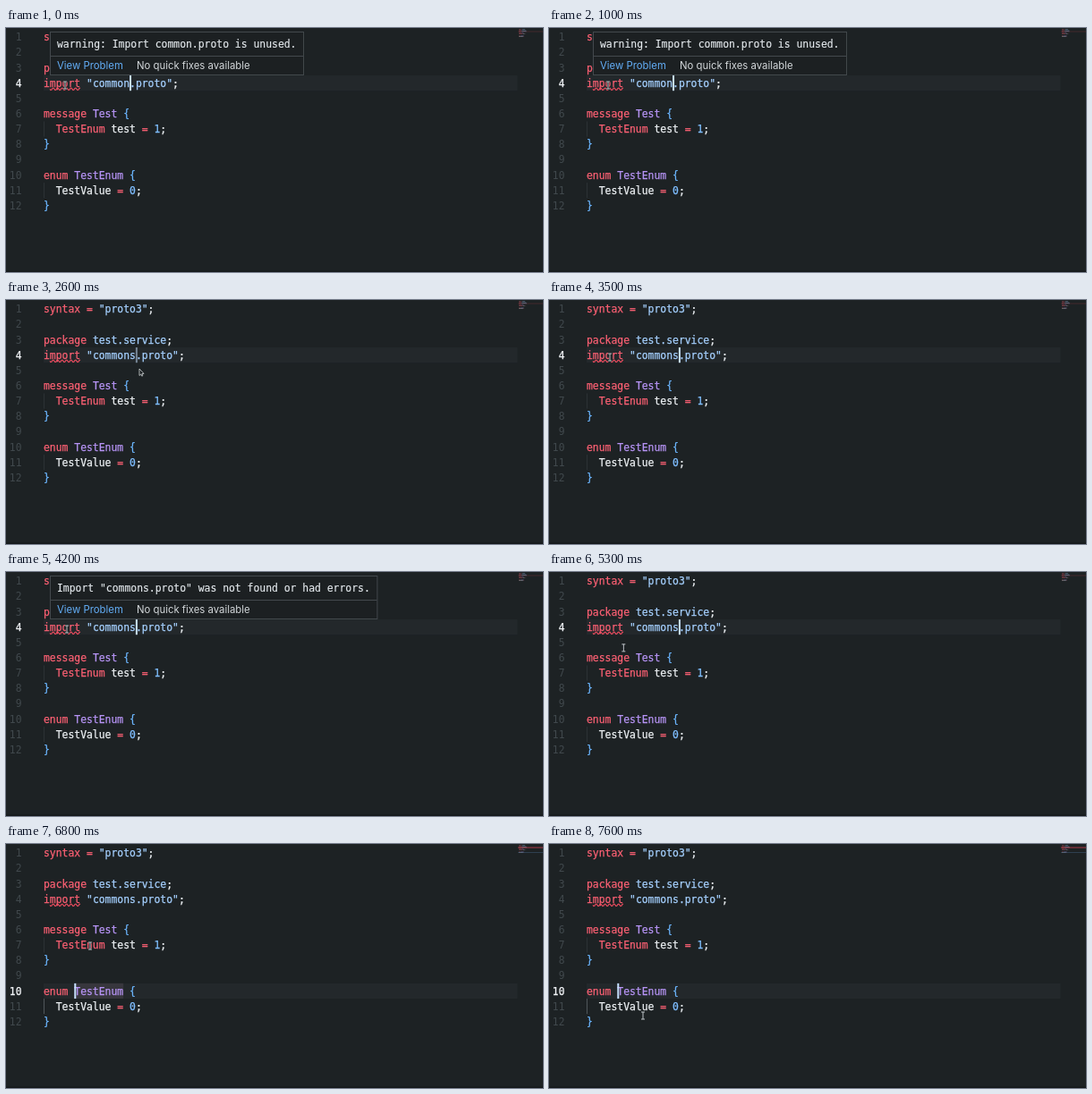
Write an HTML page with a canvas that moves like this. It is 600 px wide and 273 px high and loops after 7.7 s.

```html
<!DOCTYPE html>
<html lang="en">
<head>
<meta charset="utf-8">
<title>Editor diagnostics</title>
<style>
  html, body { margin: 0; width: 100%; height: 100%; overflow: hidden; background: #1d2224; }
  canvas { display: block; width: 600px; height: 273px; }
</style>
</head>
<body>
<canvas id="stage"></canvas>
<script>
const canvas = document.getElementById('stage');
const ctx = canvas.getContext('2d');
const ratio = window.devicePixelRatio || 1;
canvas.width = 600 * ratio;
canvas.height = 273 * ratio;
ctx.scale(ratio, ratio);

const LOOP = 7700, STEP = 100;
const TYPED = 2200, JUMPED = 6500, HIGHLIGHT_END = 7300;
const LEFT = 42, CHAR = 6.86, LINE = 17.14;
const MONO = '11.4px "DejaVu Sans Mono", monospace';
const SANS = '11.35px Inter, sans-serif';
const COLORS = {
  k: '#fb6073', s: '#a5d0ff', t: '#b794f6', n: '#7fbeff', b: '#6cb6ff', w: '#eef2f5'
};

// Each token is a colour key, a colon and its text.
const codeLines = file => [
  ['k:syntax ', 'k:= ', 's:"proto3"', 'w:;'],
  [],
  ['k:package ', 's:test.service', 'w:;'],
  ['k:import ', `s:"${file}.proto"`, 'w:;'],
  [],
  ['k:message ', 't:Test ', 'b:{'],
  ['k:  TestEnum ', 'w:test ', 'k:= ', 'n:1', 'w:;'],
  ['b:}'],
  [],
  ['k:enum ', 't:TestEnum ', 'b:{'],
  ['w:  TestValue ', 'k:= ', 'n:0', 'w:;'],
  ['b:}']
];

// Pointer stops: time, x, y.
const pointerPath = [
  [0, 66, 64], [1000, 66, 64], [1600, 150, 81], [2600, 150, 81], [3200, 68, 64],
  [5000, 68, 64], [5700, 107, 117], [6200, 107, 117], [6600, 94, 114],
  [6900, 94, 114], [7500, 105, 192], [LOOP, 105, 192]
];

const clamp = v => Math.min(1, Math.max(0, v));
const ease = v => v * v * (3 - 2 * v);
const lineCenter = n => 10.2 + LINE * (n - 1);
const columnX = c => LEFT + CHAR * c;

function rect(x, y, w, h, color) {
  ctx.fillStyle = color;
  ctx.fillRect(x, y, w, h);
}

// A hairline outline gives the code a medium weight.
function text(str, x, y, color, { font = MONO, align = 'left', weight = 0.25 } = {}) {
  ctx.font = font;
  ctx.textAlign = align;
  ctx.fillStyle = ctx.strokeStyle = color;
  ctx.fillText(str, x, y);
  if (weight) {
    ctx.lineWidth = weight;
    ctx.strokeText(str, x, y);
  }
}

function stroke(points, color, width) {
  ctx.beginPath();
  points.forEach(([x, y]) => ctx.lineTo(x, y));
  ctx.strokeStyle = color;
  ctx.lineWidth = width;
  ctx.stroke();
}

function pointerAt(t) {
  const i = pointerPath.findIndex(p => p[0] > t);
  const [t0, x0, y0] = pointerPath[i - 1], [t1, x1, y1] = pointerPath[i];
  const k = ease((t - t0) / (t1 - t0));
  return [x0 + (x1 - x0) * k, y0 + (y1 - y0) * k];
}

function caretAlpha(t) {
  const start = t >= JUMPED ? JUMPED : t >= TYPED ? TYPED : -300;
  const phase = (t - start) % 1000;
  return clamp((Math.abs(phase - 650) - 150) / 200);
}

function drawCode(lines, current) {
  lines.forEach((tokens, i) => {
    const n = i + 1, y = lineCenter(n) + 4.1;
    text(n, 17.5, y, n === current ? '#f0f3f6' : '#40484c',
      { align: 'right', weight: n === current ? 0.25 : 0 });
    let column = 0;
    for (const token of tokens) {
      const str = token.slice(2);
      text(str, columnX(column), y, COLORS[token[0]]);
      column += str.length;
    }
  });
}

function drawSquiggle() {
  const points = Array.from({ length: 35 }, (_, i) =>
    [49 + i, 68.3 + 1.3 * Math.sin(i * Math.PI / 2.5)]);
  stroke(points, '#ee4c5f', 1.1);
}

function drawMinimap(lines, jumped) {
  ctx.globalAlpha = 0.5;
  lines.forEach((tokens, i) => {
    let x = 573;
    for (const token of tokens) {
      const width = (token.length - 2) * 0.43;
      rect(x, 1 + i * 0.84, width - 0.4, 0.6, COLORS[token[0]]);
      x += width;
    }
  });
  ctx.globalAlpha = jumped ? 0.75 : 0.2;
  rect(572, 3.5, 28, 1, '#d94355');
  if (jumped) {
    ctx.globalAlpha = 0.45;
    rect(572, 9, 28, 1, '#466587');
  }
  ctx.globalAlpha = 1;
}

function drawTooltip(message, alpha) {
  const width = message.length * CHAR + 16.5;
  ctx.globalAlpha = alpha;
  rect(49, 4, width, 49, '#1c2022');
  ctx.strokeStyle = '#43494d';
  ctx.lineWidth = 1;
  ctx.strokeRect(49.5, 4.5, width - 1, 48);
  rect(50, 31, width - 2, 1, '#43494d');
  text(message, 57, 22, '#e4e9ed', { weight: 0.15 });
  text('View Problem', 57, 46, '#63aef7', { font: SANS, weight: 0 });
  text('No quick fixes available', 146, 46, '#d3d7da', { font: SANS, weight: 0 });
  ctx.globalAlpha = 1;
}

function drawPointer(x, y, arrow) {
  if (arrow) {
    ctx.beginPath();
    [[-1, -4], [-1, 3.5], [0.7, 2], [1.8, 4.2], [2.8, 3.7], [1.8, 1.6], [4, 1.4]]
      .forEach(([dx, dy]) => ctx.lineTo(x + dx, y + dy));
    ctx.closePath();
    ctx.fillStyle = '#15191b';
    ctx.fill();
    ctx.strokeStyle = '#d4d8da';
    ctx.lineWidth = 0.8;
    ctx.stroke();
    return;
  }
  for (const [color, width] of [['#1a1e20', 2.2], ['#bfc5c9', 1]]) {
    stroke([[x - 2, y - 4], [x + 2, y - 4]], color, width);
    stroke([[x, y - 4], [x, y + 4]], color, width);
    stroke([[x - 2, y + 4], [x + 2, y + 4]], color, width);
  }
}

function draw(t) {
  const typed = t >= TYPED, jumped = t >= JUMPED;
  const current = jumped ? 10 : 4;
  const lines = codeLines(typed ? 'commons' : 'common');
  const top = lineCenter(current) - LINE / 2;

  rect(0, 0, 600, 273, '#1d2224');
  rect(LEFT, top, 529.5, LINE, '#23282b');
  if (jumped && t < HIGHLIGHT_END) rect(columnX(5), top, CHAR * 8, LINE, '#37363d');
  for (const n of [7, 11]) {
    rect(LEFT, lineCenter(n) - LINE / 2, 1, LINE, jumped && n === 11 ? '#50575b' : '#2c3235');
  }

  drawCode(lines, current);
  drawSquiggle();
  drawMinimap(lines, jumped);

  ctx.globalAlpha = caretAlpha(t);
  rect(columnX(jumped ? 5 : typed ? 15 : 14), top, 2, LINE, '#c8e1ff');
  ctx.globalAlpha = 1;

  if (t < 1200) drawTooltip('warning: Import common.proto is unused.', 1);
  if (t >= 3800 && t < 5200) {
    drawTooltip('Import "commons.proto" was not found or had errors.', clamp((t - 3700) / 200));
  }

  rect(0, 271.5, 600, 1.5, '#14181a');
  const [x, y] = pointerAt(t);
  drawPointer(x, y, t >= 1500 && t < 2800);
}

function tick(now) {
  draw(Math.floor(now % LOOP / STEP) * STEP);
  requestAnimationFrame(tick);
}
requestAnimationFrame(tick);
</script>
</body>
</html>
```
